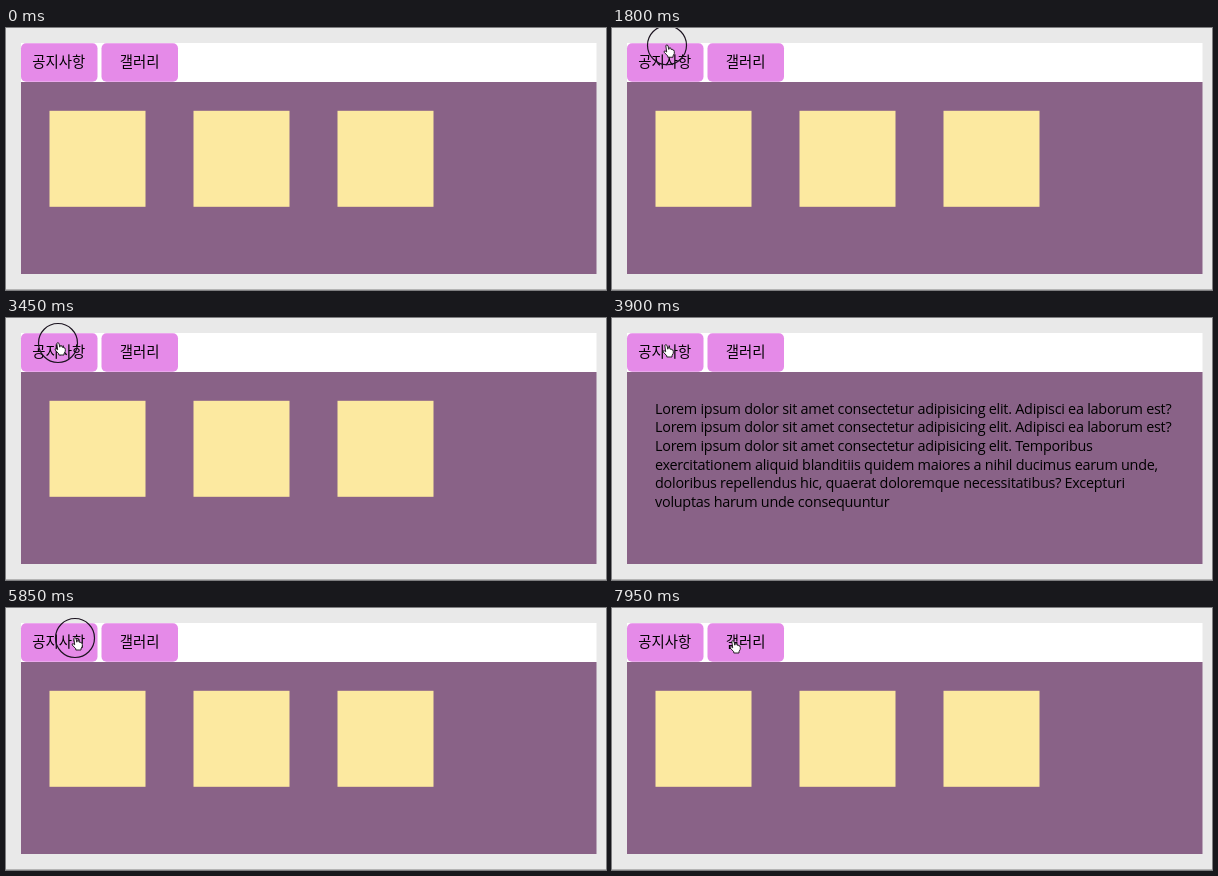
Write an HTML page that moves like this. It is 600 px wide and 262 px high and loops after 8100 ms.

```html
<!DOCTYPE html>
<html lang="ko">
<head>
<meta charset="utf-8">
<title>Tabs</title>
<style>
  html, body { margin: 0; width: 100%; height: 100%; overflow: hidden; background: #e9e9e9; }
  svg { display: block; width: 600px; height: 262px; }
  .tab rect { fill: #e58ae8; }
  .tab text { font: 14.4px "Noto Sans CJK KR", "Noto Sans CJK", sans-serif; text-anchor: middle; }
  #notice { font: 14.4px "Open Sans", "Noto Sans", sans-serif; letter-spacing: -.25px; }
  #gallery { fill: #fce9a0; }
  #ring { fill: none; stroke: #1c1420; stroke-width: 1.2; }
  #hand, #arrow { fill: #fff; stroke: #111; stroke-width: .9; stroke-linejoin: round; }
</style>
</head>
<body>
<svg viewBox="0 0 600 262">
  <rect width="600" height="262" fill="#e9e9e9"/>
  <rect y="261" width="600" height="1" fill="#b4b4b4"/>
  <rect x="15" y="15" width="575.5" height="39" fill="#fff"/>
  <rect x="15" y="54" width="575.5" height="192" fill="#896287"/>
  <g class="tab">
    <rect x="15" y="15.3" width="76.5" height="38.4" rx="5"/>
    <text x="52.8" y="39">공지사항</text>
  </g>
  <g class="tab">
    <rect x="95.5" y="15.3" width="76.5" height="38.4" rx="5"/>
    <text x="133.6" y="39">갤러리</text>
  </g>
  <g id="gallery">
    <rect x="43.5" y="82.8" width="96" height="96"/>
    <rect x="187.5" y="82.8" width="96" height="96"/>
    <rect x="331.5" y="82.8" width="96" height="96"/>
  </g>
  <g id="notice">
    <text x="43" y="95.8">Lorem ipsum dolor sit amet consectetur adipisicing elit. Adipisci ea laborum est?</text>
    <text x="43" y="114.4">Lorem ipsum dolor sit amet consectetur adipisicing elit. Adipisci ea laborum est?</text>
    <text x="43" y="133">Lorem ipsum dolor sit amet consectetur adipisicing elit. Temporibus</text>
    <text x="43" y="151.6">exercitationem aliquid blanditiis quidem maiores a nihil ducimus earum unde,</text>
    <text x="43" y="170.2">doloribus repellendus hic, quaerat doloremque necessitatibus? Excepturi</text>
    <text x="43" y="188.8">voluptas harum unde consequuntur</text>
  </g>
  <g id="pointer">
    <circle id="ring" r="19.5"/>
    <path id="hand" d="M-1.2 .3Q0-1 1 .4L1.8 4.2Q3-.1 4.2 4.3 5.4 3.2 5.9 4.9 7.3 4.3 7.3 6.3V8.2L6 10.7V12H.8V10.8L-2.8 7Q-3.3 5.4-1.8 5.7L-.3 6.8Z"/>
    <path id="arrow" d="M0 0V11L2.5 8.7 4.2 12.4 5.9 11.6 4.3 8H7.8Z"/>
  </g>
</svg>
<script>
  const LOOP = 8100, STEP = 150;
  const $ = id => document.getElementById(id);
  const show = (id, on) => $(id).setAttribute('visibility', on ? 'visible' : 'hidden');

  // time, x, y of the pointer hot spot
  const path = [
    [150, 277, 231], [1050, 70, 29], [1650, 55, 17], [2100, 55, 18],
    [2700, 134, 35], [3000, 134, 35], [3450, 52, 25], [3600, 52, 25],
    [3900, 54, 27], [4200, 55, 27], [4650, 124, 28], [4950, 124, 28],
    [5700, 69, 30], [6000, 69, 30], [6750, 121, 33], [LOOP, 121, 33]
  ];
  const clicks = [1950, 3000, 3750, 4950, 6000, 7050];
  const ease = u => u * u * (3 - 2 * u);

  function position(t) {
    const i = Math.max(1, path.findIndex(p => p[0] > t));
    const [t0, x0, y0] = path[i - 1], [t1, x1, y1] = path[i];
    const k = ease(Math.max(0, (t - t0) / (t1 - t0)));
    return [x0 + (x1 - x0) * k, y0 + (y1 - y0) * k];
  }

  function draw(now) {
    const t = Math.floor((now % LOOP) / STEP) * STEP;
    const [x, y] = position(t);
    const visible = t >= STEP;
    const onTab = y > 14 && y < 54 && x < 172;
    const notice = clicks.filter(c => t >= c).length % 2 === 1;

    $('pointer').setAttribute('transform', `translate(${x} ${y})`);
    show('hand', visible && onTab);
    show('arrow', visible && !onTab);
    show('ring', clicks.some(c => t >= c - 2 * STEP && t < c));
    show('notice', notice);
    show('gallery', !notice);
  }

  const start = performance.now();
  function tick() {
    draw(performance.now() - start);
    requestAnimationFrame(tick);
  }
  tick();
</script>
</body>
</html>
```
